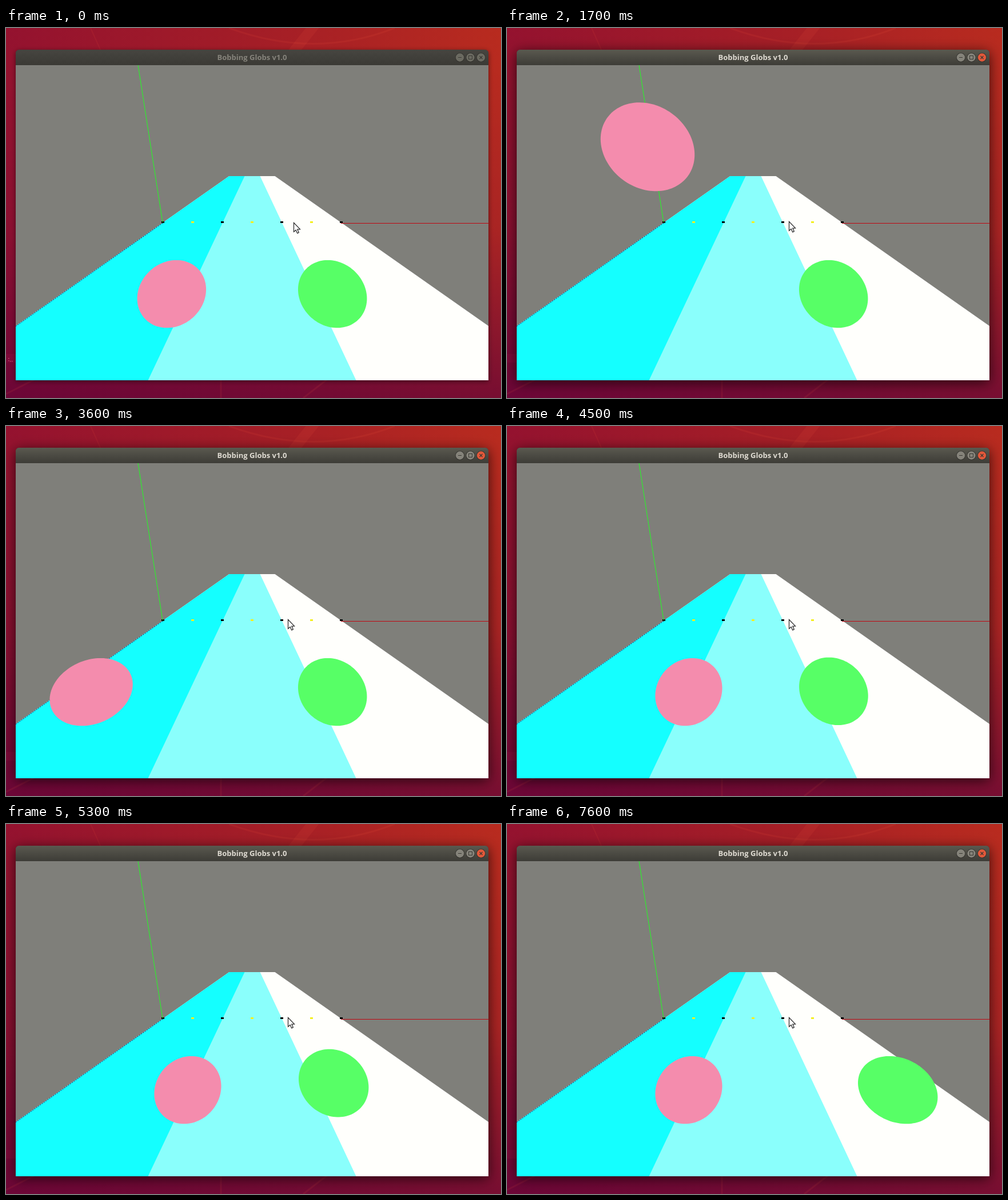
Recreate the animation shown at these times as an HTML page with a canvas. Size 866x647 px, loop 8000 ms.

```html
<!DOCTYPE html>
<html lang="en">
<head>
<meta charset="utf-8">
<title>Bobbing Globs</title>
<style>
html, body { margin: 0; width: 100%; height: 100%; overflow: hidden; background: #85102c; }
canvas { display: block; }
</style>
</head>
<body>
<canvas id="stage" width="866" height="647"></canvas>
<script>
const ctx = document.getElementById('stage').getContext('2d');
const LOOP = 8000, STEP = 100;
const WIN = { left: 17, top: 38, right: 844, bottom: 616, bar: 27 };
const VIEW = { x: 430.5, y: 340.75, focal: 328.3 };

// Balls have radius 1 in camera space; each move is [ms, x].
const pink = {
  color: '#f48cad',
  moves: [[0, -2.5], [2300, -3], [2800, -4], [2900, -5], [3000, -6], [3600, -5], [3700, -3], [4100, -2]],
  hop: { peak: 1542, span: 900 }
};
const green = {
  color: '#57ff66',
  moves: [[0, 2.5], [5600, 2], [5900, 0.5], [6000, -1], [6100, -3], [6900, -1.5], [7000, 0], [7100, 2], [7200, 3.5], [7600, 4.5]],
  hop: { peak: 4917, span: 860, rest: 5300, landed: 5600 }
};

function polygon(points, fill) {
  ctx.beginPath();
  points.forEach(([x, y]) => ctx.lineTo(x, y));
  ctx.closePath();
  if (fill) { ctx.fillStyle = fill; ctx.fill(); }
}

function line(x1, y1, x2, y2, color, width = 1, dash = []) {
  ctx.strokeStyle = color;
  ctx.lineWidth = width;
  ctx.setLineDash(dash);
  ctx.beginPath();
  ctx.moveTo(x1, y1);
  ctx.lineTo(x2, y2);
  ctx.stroke();
  ctx.setLineDash([]);
}

function disc(x, y, r, fill) {
  ctx.beginPath();
  ctx.arc(x, y, r, 0, 2 * Math.PI);
  ctx.fillStyle = fill;
  ctx.fill();
}

function gradient(x1, y1, x2, y2, ...colors) {
  const g = ctx.createLinearGradient(x1, y1, x2, y2);
  colors.forEach((c, i) => g.addColorStop(i / (colors.length - 1), c));
  return g;
}

function project(x, y, z) {
  return [VIEW.x + VIEW.focal * x / z, VIEW.y + VIEW.focal * y / z];
}

function hopHeight({ peak, span, rest, landed }, t) {
  if (t > rest && t < landed) t = rest;
  const phase = Math.PI * (t - peak) / span;
  return Math.abs(phase) < Math.PI / 2 ? 5.6 * Math.cos(phase) ** 1.75 : 0;
}

function place(ball, t) {
  const x = ball.moves.filter(m => m[0] <= t).pop()[1];
  const h = hopHeight(ball.hop, t);
  return { x, y: 2.21 - 0.9487 * h, z: 6 - 0.3162 * h, color: ball.color };
}

// The visible rim of a sphere is a circle perpendicular to the line of sight.
function drawBall({ x, y, z, color }) {
  const dist = Math.hypot(x, y, z), flat = Math.hypot(x, z);
  const k = 1 - 1 / dist ** 2, r = Math.sqrt(k);
  const u = [z / flat, 0, -x / flat];
  const v = [-x * y / (flat * dist), flat / dist, -y * z / (flat * dist)];
  const rim = [];
  for (let i = 0; i < 120; i++) {
    const a = i * Math.PI / 60, c = r * Math.cos(a), s = r * Math.sin(a);
    rim.push(project(x * k + c * u[0] + s * v[0], y * k + c * u[1] + s * v[1], z * k + c * u[2] + s * v[2]));
  }
  polygon(rim, color);
}

// Cuts the nearer ball along the circle where the two spheres meet.
function clipAtSeam(far, near) {
  const mid = (far.x + near.x) / 2;
  const r = Math.sqrt(1 - ((near.x - far.x) / 2) ** 2);
  const seam = [];
  for (let i = 0; i <= 40; i++) {
    const a = Math.PI / 6 + i / 40 * Math.PI * 5 / 6;
    seam.push(project(mid, near.y + r * Math.cos(a), near.z - r * Math.sin(a)));
  }
  polygon([[WIN.right, WIN.bottom], [seam[0][0], WIN.bottom], ...seam, [seam[40][0], 0], [WIN.right, 0]]);
  ctx.clip();
}

function drawDesktop(t) {
  ctx.fillStyle = gradient(0, 0, 866, 0, '#94122f', '#a31d27', '#b82b1f');
  ctx.fillRect(0, 0, 866, 647);
  ctx.fillStyle = gradient(0, 60, 0, 647, '#5a003a00', '#5a003a28', '#5a003ab0');
  ctx.fillRect(0, 0, 866, 647);
  const faint = '#ff604018';
  line(540, -5, 500, 45, faint, 18);
  line(148, 0, 166, 40, faint, 2);
  line(376, 612, 376, 647, faint, 3);
  line(520, 647, 565, 612, faint, 3);
  line(0, 640, 55, 612, faint, 3);
  ctx.strokeStyle = faint;
  ctx.lineWidth = 3;
  ctx.beginPath();
  ctx.moveTo(390, 0);
  ctx.quadraticCurveTo(540, 55, 680, 0);
  ctx.stroke();
  ctx.fillStyle = '#d0206018';
  ctx.fillRect(0, 570, 17, 15);
  if (t < 800) {
    ctx.fillStyle = '#c04870';
    [[4, 577], [4, 581], [7, 582], [10, 582]].forEach(([x, y]) => ctx.fillRect(x, y, 1.5, 1.5));
  }
}

function drawWindow(focus) {
  const { left, top, right, bottom, bar } = WIN, width = right - left;
  ctx.save();
  ctx.shadowColor = focus ? '#000000b0' : '#00000080';
  ctx.shadowBlur = 8 + 14 * focus;
  ctx.shadowOffsetY = 2 + 2 * focus;
  ctx.beginPath();
  ctx.roundRect(left, top, width, bottom - top, [6, 6, 0, 0]);
  ctx.fillStyle = '#3c3b37';
  ctx.fill();
  ctx.restore();
  ctx.beginPath();
  ctx.roundRect(left, top, width, bar, [6, 6, 0, 0]);
  ctx.fillStyle = gradient(0, top, 0, top + bar, '#464540', '#3b3a35');
  ctx.fill();
  ctx.globalAlpha = focus;
  ctx.fillStyle = gradient(0, top, 0, top + bar, '#5a594f', '#3d3c37');
  ctx.fill();
  ctx.globalAlpha = 1;

  ctx.fillStyle = focus === 1 ? '#dfdbd2' : focus ? '#b0ada5' : '#85837b';
  ctx.font = 'bold 13px "Open Sans", "Noto Sans", sans-serif';
  ctx.textAlign = 'center';
  ctx.fillText('Bobbing Globs v1.0', 430.5, 56);

  const ink = '#3a3934';
  [794, 812.5, 831].forEach((x, i) => {
    disc(x, 51.5, 8, '#33322e');
    disc(x, 51.5, 7.2, focus ? (i === 2 ? '#e2583a' : '#85837a') : '#6b6a61');
  });
  line(791, 51.5, 797, 51.5, ink);
  ctx.strokeRect(809.5, 48.5, 6, 6);
  line(828.5, 49, 833.5, 54, ink, 1.2);
  line(828.5, 54, 833.5, 49, ink, 1.2);
}

function drawScene(t) {
  const { left, top, right, bottom, bar } = WIN;
  ctx.save();
  ctx.beginPath();
  ctx.rect(left, top + bar, right - left, bottom - top - bar);
  ctx.clip();
  ctx.fillStyle = '#7f7f7a';
  ctx.fillRect(left, top, right - left, bottom - top);

  polygon([[390.5, 259], [470.5, 259], [844, 521], [844, 616], [17, 616], [17, 521]], '#fffffc');
  polygon([[390.5, 259], [444.5, 259], [612.5, 616], [17, 616], [17, 521]], '#8afffc');
  polygon([[390.5, 259], [417.5, 259], [248.5, 616], [17, 616], [17, 521]], '#14ffff');

  line(274, 341, 17, 521.5, '#101060', 1, [2, 2]);
  line(231, 65, 274, 340, '#20ff20');
  line(586, 341.5, 844, 341.5, '#c00812');
  for (let i = 0; i < 7; i++) {
    ctx.fillStyle = i % 2 ? '#f4f020' : '#000';
    ctx.fillRect(Math.round(272 + 52 * i), 338, 5, 3);
  }
  ctx.fillStyle = '#20d020';
  ctx.fillRect(274, 338, 1, 2);

  // On the left half of the view the ball with the larger x is nearer.
  const [far, near] = [place(pink, t), place(green, t)].sort((a, b) => a.x - b.x);
  drawBall(far);
  if (near.x - far.x < 2 && near.y === far.y) clipAtSeam(far, near);
  drawBall(near);
  ctx.restore();
}

function drawCursor(x, y) {
  const shape = [[0, 0], [0, 16], [3.6, 12.7], [6.2, 18.4], [8.8, 17.2], [6.3, 11.6], [11, 11.4]];
  polygon(shape.map(([dx, dy]) => [x + dx, y + dy]), '#fff');
  ctx.strokeStyle = '#222';
  ctx.lineWidth = 1.2;
  ctx.stroke();
}

function frame(now) {
  const t = Math.floor(now % LOOP / STEP) * STEP;
  drawDesktop(t);
  drawWindow(t < 800 ? 0 : t < 900 ? 0.5 : 1);
  drawScene(t);
  if (t < 500) drawCursor(503.5, 340.5);
  else if (t >= 1100) drawCursor(493.5, 338.5);
  requestAnimationFrame(frame);
}

const start = performance.now();
requestAnimationFrame(now => frame(Math.max(0, now - start)));
</script>
</body>
</html>
```
